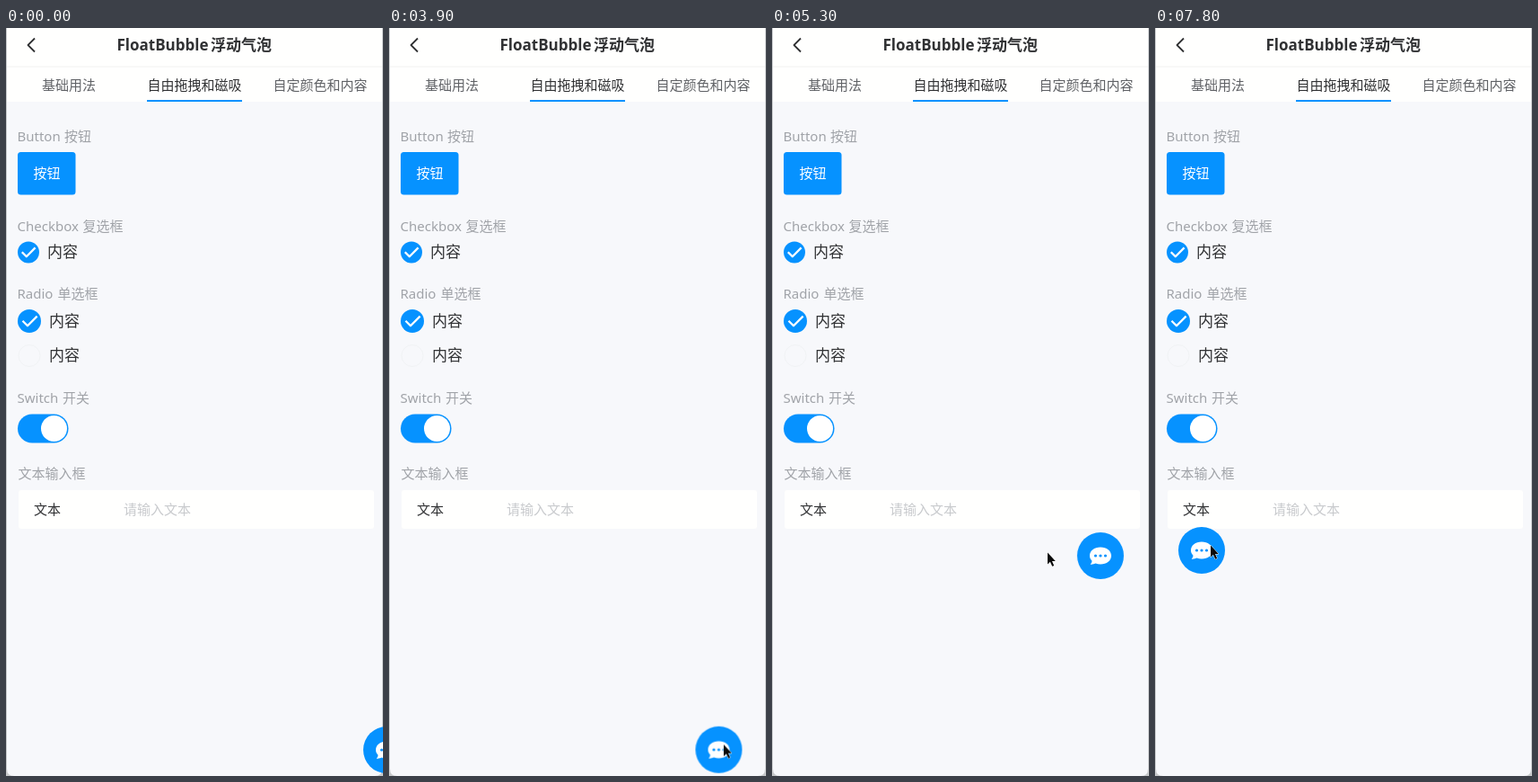
Recreate the animation shown at these times as an HTML page. Size 420 by 832 pixels, loop 8000 ms.

```html
<!DOCTYPE html>
<html lang="zh-CN">
<head>
<meta charset="utf-8">
<title>浮动气泡</title>
<style>
  html, body { margin: 0; width: 100%; height: 100%; overflow: hidden; background: #c6c8ca; }
  svg { display: block; width: 420px; height: 832px; }
  text { font: 15px "Noto Sans", "Noto Sans CJK SC", "Noto Sans CJK", sans-serif; fill: #303133; }
  .label { fill: #a0a3a8; }
  .tab { fill: #606266; }
  .title { font-size: 17px; font-weight: 600; }
  .option { font-size: 17px; }
  .hint { fill: #c8cacd; }
  .blue { fill: #0692ff; }
  .white { fill: #fff; }
  .line { fill: none; stroke-width: 2.3; stroke-linejoin: round; }
</style>
</head>
<body>
<svg viewBox="0 0 420 832" xmlns="http://www.w3.org/2000/svg">
  <path d="M1 0H419V824Q419 832 411 832H9Q1 832 1 824Z" fill="#f7f8fb"/>
  <path d="M1 0H419V82H1Z" fill="#fffffe"/>
  <path d="M1 43H419" stroke="#f1f1f1"/>
  <path class="line" d="M32 11.5L24.5 19L32 26.5" stroke="#303133" style="stroke-width:1.8"/>
  <rect class="blue" x="157" y="80" width="106" height="2"/>

  <rect class="blue" x="13" y="138" width="64.5" height="47.5" rx="3.5"/>

  <circle class="blue" cx="25" cy="249.5" r="12"/>
  <path class="line" d="M17.8 249.3L22.8 254.2L32.6 244.4" stroke="#fff"/>
  <circle class="blue" cx="26" cy="326" r="13"/>
  <path class="line" d="M18.5 325.8L24 331.2L34.6 320.6" stroke="#fff"/>
  <circle cx="26" cy="364.5" r="12" fill="none" stroke="#f1f3f5"/>

  <rect class="blue" x="13" y="429.5" width="56.5" height="32" rx="16"/>
  <circle class="white" cx="53.5" cy="445.5" r="14.5"/>
  <rect x="14" y="514" width="396" height="43" rx="3" fill="#fffffe"/>
  <g id="texts"></g>

  <g id="bubble">
    <circle class="blue" r="26"/>
    <path class="white" d="M0 -9.5C7 -9.5 12 -5.4 12 0S7 9.5 0 9.5C-2 9.5 -3.8 9.2 -5.4 8.6C-7.2 9.5 -9.2 9.9 -11.3 9.7C-9.9 8.3 -9.4 7 -9.6 5.6C-11.2 4 -12 2.1 -12 0C-12 -5.4 -7 -9.5 0 -9.5Z"/>
    <g class="blue"><circle cx="-5.5" r="1.6"/><circle r="1.6"/><circle cx="5.5" r="1.6"/></g>
  </g>
  <path id="cursor" d="M0 0.5V13.5L2.9 10.8L5.2 15.8L7.2 14.9L5 10H8.8Z" fill="#0a0a0a" stroke="#fff" stroke-width="1" paint-order="stroke"/>
</svg>
<script>
const LOOP = 8000;

// x, baseline, text, classes
const texts = [
  [123.5, 25, 'FloatBubble', 'title'], [228, 25, '浮动气泡', 'title'],
  [40, 68.5, '基础用法', 'tab'], [157.5, 68.5, '自由拖拽和磁吸', ''], [297.5, 68.5, '自定颜色和内容', 'tab'],
  [12.5, 126, 'Button', 'label'], [65, 126, '按钮', 'label'],
  [30.5, 167, '按钮', 'white'],
  [12.5, 225.5, 'Checkbox', 'label'], [85.5, 225.5, '复选框', 'label'],
  [46, 255, '内容', 'option'],
  [12.5, 301, 'Radio', 'label'], [57.5, 301, '单选框', 'label'],
  [48, 332, '内容', 'option'], [48, 370, '内容', 'option'],
  [12.5, 417, 'Switch', 'label'], [63, 417, '开关', 'label'],
  [13.5, 501, '文本输入框', 'label'],
  [31, 541, '文本', ''], [131, 541, '请输入文本', 'hint'],
];

for (const [x, y, content, classes] of texts) {
  const node = document.createElementNS('http://www.w3.org/2000/svg', 'text');
  node.setAttribute('x', x);
  node.setAttribute('y', y);
  node.setAttribute('class', classes);
  node.textContent = content;
  document.getElementById('texts').append(node);
}

// time, x, y, easing towards the next step
const bubbleSteps = [
  [0, 424, 803], [2720, 424, 803, 'ease-in-out'], [3150, 392, 803, 'ease'],
  [3500, 367.5, 803], [3880, 367.5, 803, 'ease-in'], [4400, 334, 713, 'ease-out'],
  [4750, 299, 587], [5060, 299, 587, 'ease'],
  [5360, 367.5, 587], [6020, 367.5, 587, 'ease-in'], [6270, 244.5, 587, 'ease-out'],
  [6520, 117, 586], [6580, 117, 586, 'ease-in-out'], [6840, 236, 581],
  [6890, 236, 581, 'ease-in-out'], [7350, 72, 581, 'ease'], [7650, 52, 581],
];
const cursorSteps = [
  [0, 440, 740], [1050, 440, 740, 'ease-out'], [1330, 358, 716],
  [1620, 358, 716, 'ease-in-out'], [2430, 405, 800], [2720, 405, 800, 'ease-in-out'],
  [3080, 373, 797], [3880, 373, 797, 'ease-in'], [4400, 318, 629, 'ease-out'],
  [4650, 307, 583], [5350, 307, 583, 'ease-in-out'],
  [5870, 368, 583], [6010, 368, 583, 'ease-in'], [6270, 174.5, 584, 'ease-out'],
  [6430, 118, 582], [6540, 118, 582, 'ease-in-out'], [6780, 237, 576],
  [6880, 237, 576, 'ease-in-out'], [7280, 73, 576, 'ease-in-out'], [7800, 62, 575],
];

function play(id, steps) {
  const frames = [...steps, [LOOP, ...steps.at(-1).slice(1, 3)]].map(([time, x, y, easing = 'linear']) => ({
    offset: time / LOOP, transform: `translate(${x}px, ${y}px)`, easing,
  }));
  document.getElementById(id).animate(frames, { duration: LOOP, iterations: Infinity });
}

play('bubble', bubbleSteps);
play('cursor', cursorSteps);
</script>
</body>
</html>
```
